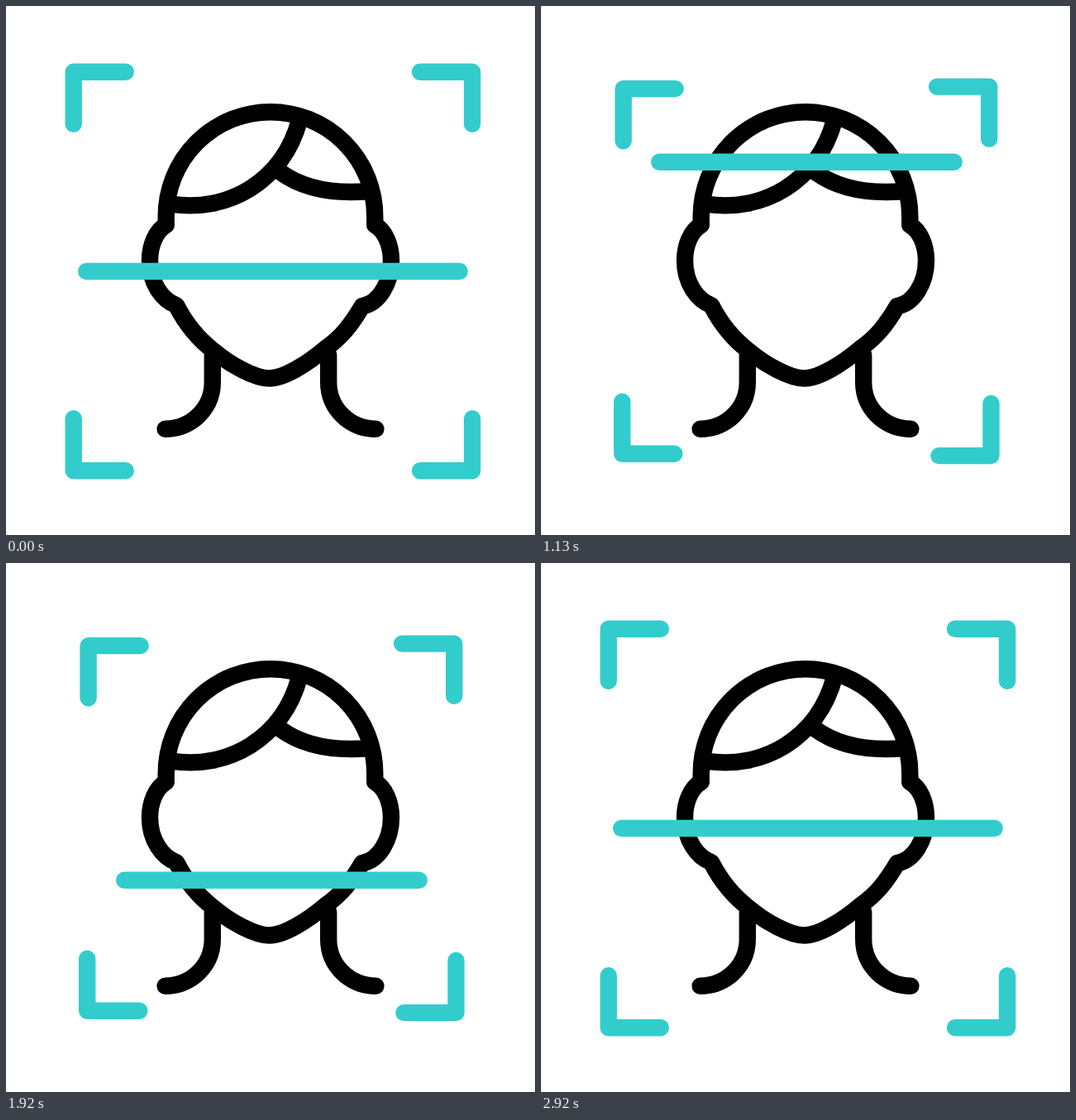
Recreate the animation shown at these times as an HTML page. Size 640x640 px, loop 3000 ms.

```html
<!DOCTYPE html>
<html lang="en">
<head>
<meta charset="utf-8">
<title>Face scan</title>
<style>
  html, body { margin: 0; height: 100%; overflow: hidden; background: #fff; }
  svg { display: block; width: 100%; height: 100%; }
  path { fill: none; stroke-width: 20.4; stroke-linecap: round; stroke-linejoin: round; }
  .ink { stroke: #000; }
  .scan { stroke: #33cccc; }
</style>
</head>
<body>
<svg viewBox="0 0 640 640">
  <path class="ink" id="face"/>
  <path class="ink" id="neck" d="M249.8 422V455C249.8 487 224 511.7 192.6 511.7"/>
  <use href="#neck" transform="matrix(-1 0 0 1 640 0)"/>
  <path class="scan" id="frame"/>
  <path class="scan" id="bar"/>
</svg>
<script>
const FPS = 24, LOOP = 3000;
const set = (id, d) => document.getElementById(id).setAttribute('d', d);
const ramp = (f, from, to) => Math.min(1, Math.max(0, (f - from) / (to - from)));
const smooth = p => p * p * (3 - 2 * p);
// Rises from 0 to 1 around a middle frame and falls back.
const bump = (f, mid, half) => smooth(1 - Math.min(1, Math.abs(f - mid) / half));

// Bracket around the centre; sx and sy give its side, dx and dy its inward travel.
function corner(sx, sy, dx, dy) {
  const x = 322.9 + sx * (241.2 - dx), y = 321 + sy * (241.3 - dy);
  return `M${x} ${y - sy * 63.1}V${y}H${x - sx * 63.1}`;
}

// n = 0 looks straight ahead, n = 1 is the deepest nod.
function facePath(n) {
  const ear = 265 + 2 * n, mid = 308 - 4 * n, chin = 450.5 + 4 * n;
  return `M193.7 ${ear}V254.5A126.3 126.3 0 0 1 446.3 254.5V${ear}
    C459 ${ear + 7} 466 ${mid - 18} 466 ${mid}
    C466 ${mid + 27} 451 360 431 363
    C${417 + 8 * n} 387 ${405 + 8 * n} ${401 + 2 * n} ${387.5 + 5 * n} ${413.5 + 7 * n}
    C${364 + 4 * n} ${433.5 + 6 * n} 336 ${chin} 318.5 ${chin}
    C301 ${chin} 271 ${434 + 5 * n} ${251 - 2 * n} ${417 + 5 * n}
    C${232 - 5 * n} ${402.5 + 2 * n} ${217.5 - 4 * n} ${384.5 + n} 206 362
    C189 356 174 ${mid + 27} 174 ${mid}
    C174 ${mid - 18} 181 ${ear + 7} 193.7 ${ear}
    M200 ${239.7 + 3 * n}C268 ${250 + 4 * n} 335 ${213 + 6 * n} 355 138
    M${332 - 2 * n} ${201 + 5 * n}C358 ${220 + 4 * n} 395 ${228 + 4 * n} 440 ${224 + 3 * n}`;
}

function draw(time) {
  const f = Math.floor((time % LOOP + 5) * FPS / 1000) % (LOOP * FPS / 1000);
  const back = ramp(f, 62.4, 69.6);
  const close = ramp(f, 1.6, 11.2) - back;
  const rise = ramp(f, 14, 18);
  const narrow = rise - back;
  const y = 321 - 163 * rise + 328.3 * ramp(f, 24, 56) - 165.3 * back;

  set('frame', corner(-1, -1, 17.9 * close, 20.4 * close)
    + corner(1, -1, 21.9 * close, 17.9 * close)
    + corner(-1, 1, 16.5 * close, 20.6 * close)
    + corner(1, 1, 19.6 * close, 18.2 * close));
  set('bar', `M${97.2 + 46 * narrow} ${y}H${548.7 - 49 * narrow}`);
  set('face', facePath(bump(f, 12, 8) + bump(f, 56, 6)));
}

const start = performance.now();
function tick() {
  draw(performance.now() - start);
  requestAnimationFrame(tick);
}
tick();
</script>
</body>
</html>
```
